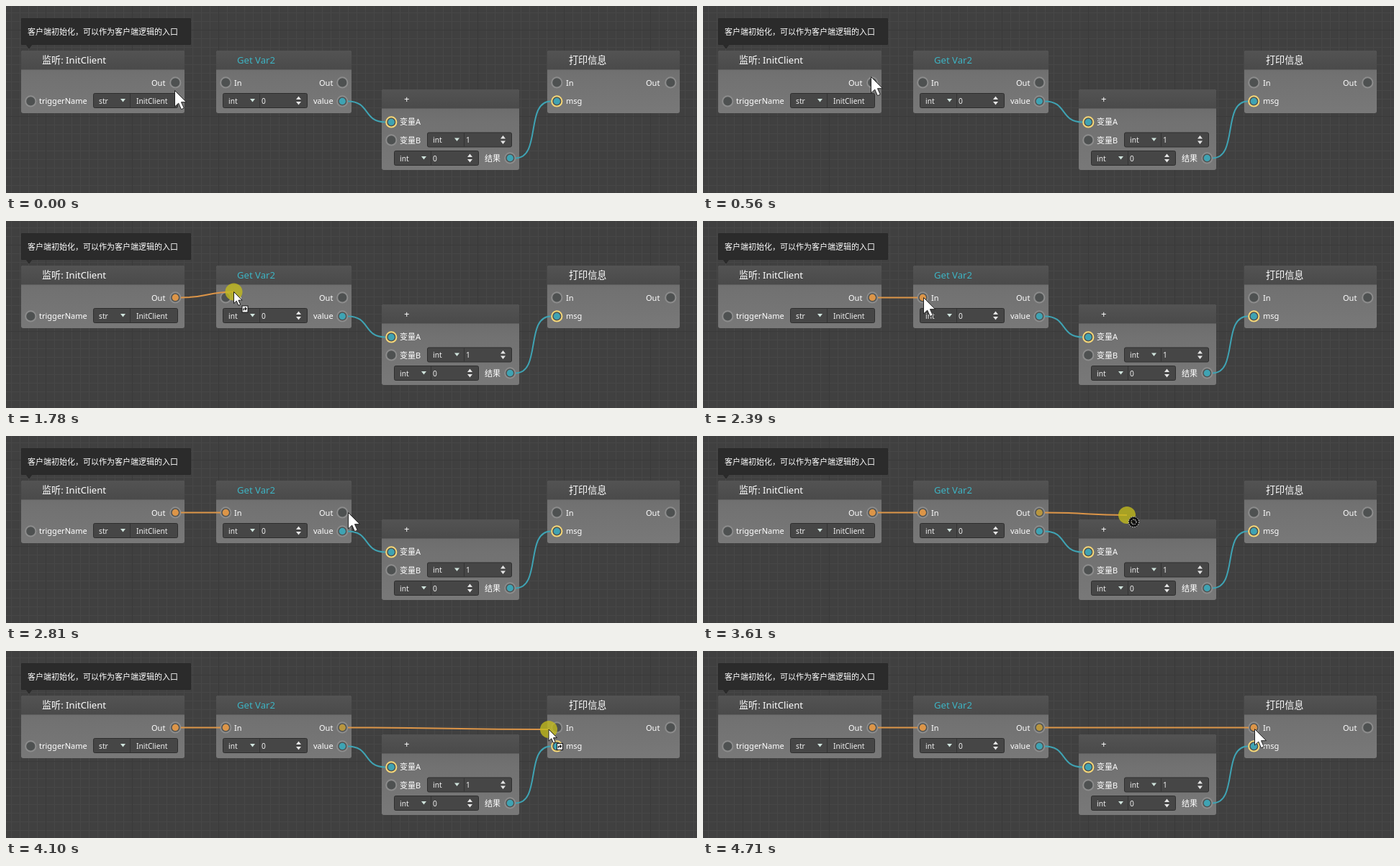
Animation, 960 px wide and 260 px high, one loop 5370 ms. Source, as an HTML page:

```html
<!DOCTYPE html>
<html lang="zh-CN">
<head>
<meta charset="utf-8">
<title>Node graph</title>
<style>
html, body { margin: 0; width: 100%; height: 100%; overflow: hidden; background: #404040; }
svg { display: block; width: 960px; height: 260px; }
text { font-family: "Noto Sans", "Noto Sans CJK SC", sans-serif; fill: #fff; white-space: pre; }
.title { font-size: 13.1px; }
.label { font-size: 11px; }
.field { font-size: 10.2px; fill: #f0f0f0; }
.wire { fill: none; stroke-width: 2; }
</style>
</head>
<body>
<svg id="stage" viewBox="0 0 960 260">
  <defs>
    <pattern id="minor" width="12" height="12" patternUnits="userSpaceOnUse" x="7" y="9">
      <path d="M0 .5H12M.5 0V12" stroke="#474747"/>
    </pattern>
    <pattern id="major" width="120" height="120" patternUnits="userSpaceOnUse" x="55" y="33">
      <path d="M0 .5H120M.5 0V120" stroke="#3a3a3a"/>
    </pattern>
    <linearGradient id="head" x2="0" y2="1">
      <stop stop-color="#535353"/><stop offset="1" stop-color="#4a4a4a"/>
    </linearGradient>
    <linearGradient id="body" x2="0" y2="1">
      <stop stop-color="#686868"/><stop offset=".4" stop-color="#737373"/><stop offset="1" stop-color="#7a7a7a"/>
    </linearGradient>
  </defs>
  <rect width="960" height="260" fill="#404040"/>
  <rect width="960" height="260" fill="url(#minor)"/>
  <rect width="960" height="260" fill="url(#major)"/>
</svg>
<script>
const stage = document.getElementById('stage');
const BLUE = '#3fa3b3', ORANGE = '#dc9548', GOLD = '#f6d878';
const ROW = 106.4;

function add(tag, attrs, parent = stage) {
  const el = document.createElementNS('http://www.w3.org/2000/svg', tag);
  for (const k in attrs) el.setAttribute(k, attrs[k]);
  parent.append(el);
  return el;
}

function text(x, y, str, kind = 'label', fill) {
  const el = add('text', { x, y: y + (kind === 'title' ? 5 : 4), class: kind });
  if (fill) el.style.fill = fill;
  el.textContent = str;
}

function node(x, y, w, h, title, tx, fill) {
  const split = y + 26.5;
  add('rect', { x, y, width: w, height: h, rx: 3, fill: 'url(#body)', opacity: .97 });
  add('path', { d: `M${x} ${split}V${y + 3}q0-3 3-3H${x + w - 3}q3 0 3 3V${split}z`, fill: 'url(#head)' });
  text(tx, y + 13, title, 'title', fill);
}

function port(x, y, fill, ring = '#8c8c8c') {
  const at = { cx: x + .3, cy: y + .4 };
  add('circle', { ...at, r: 7.1, fill: '#4e5151', stroke: ring, 'stroke-width': 2 });
  return add('circle', { ...at, r: 4.6, fill: fill || 'none' });
}

function field(x, y, type, value, spin = true) {
  add('rect', { x: x + .5, y: y + .5, width: 117, height: 20, rx: 2, fill: '#464646', stroke: '#2e2e2e' });
  add('path', { d: `M${x + 51.5} ${y + 1}v19`, stroke: '#333' });
  add('path', { d: `M${x + 38} ${y + 8}h7l-3.5 4.5z`, fill: '#cfe3dc' });
  text(x + 8, y + 10.5, type, 'field');
  text(x + (spin ? 54 : 60), y + 10.5, value, 'field');
  if (spin) add('path', { d: `M${x + 102} ${y + 9}h7l-3.5-4.5zM${x + 102} ${y + 12}h7l-3.5 4.5z`, fill: '#e6e6e6' });
}

const curve = (x0, y0, x1, y1, k) =>
  `M${x0} ${y0}C${x0 + k} ${y0} ${x1 - k} ${y1} ${x1} ${y1}`;
const wire = (color, d = '') => add('path', { d, class: 'wire', stroke: color });

// Tooltip
add('path', { d: 'M21.5 17.5H256.5V53.5H36L32 59L28 53.5H21.5z', fill: '#2b2b2b', stroke: '#282828' });
text(30, 36, '客户端初始化，可以作为客户端逻辑的入口');

// Nodes
node(21, 62, 227, 87, '监听: InitClient', 50);
text(202, 106.5, 'Out');
text(46, 132, 'triggerName');
port(34, 132);
field(121, 121, 'str', 'InitClient', false);

node(292, 62, 188, 87, 'Get Var2', 321, '#3db4c4');
text(317, 106.5, 'In');
text(435, 106.5, 'Out');
text(427, 132, 'value');
field(301, 121, 'int', '0');
port(467, 132, BLUE);

node(522, 116, 191, 112, '+', 553);
text(547, 161, '变量A');
text(547, 187, '变量B');
text(665, 211.5, '结果');
field(585, 175.5, 'int', '1');
field(539, 201, 'int', '0');
port(535, 161, BLUE, GOLD);
port(535, 186);
port(700, 211, BLUE);

node(752, 62, 184, 87, '打印信息', 782);
text(778, 106.5, 'In');
text(889, 106.5, 'Out');
text(778, 132, 'msg');
port(765, 132, BLUE, GOLD);
port(923, 106);

// Ports that light up: [time, dot]
const lit = [
  [1160, port(235, 106, ORANGE)],
  [2390, port(305, 106, ORANGE)],
  [3340, port(467, 106, '#b8963f')],
  [4710, port(765, 106, ORANGE)]
];

wire(BLUE, curve(475, 132.4, 527, 161.4, 31));
wire(BLUE, curve(708, 211.4, 757, 132.4, 36));

// Drags: press and release times with both wire ends
const drags = [
  { from: 1160, to: 2390, x0: 243, x1: 298, hit: 296 },
  { from: 3340, to: 4710, x0: 475, x1: 758, hit: 750 }
].map(d => ({ ...d, line: wire(ORANGE) }));

// Pointers
const halo = add('circle', { r: 12, fill: '#c4bd1c', opacity: .78 });
const arrowPath = 'M0 0V22.5L5.2 17.6L9 26.2L12.8 24.5L9 16.2H16z';
const big = add('g', {}), link = add('g', {}), deny = add('g', {});
add('path', { d: arrowPath, fill: '#fff', stroke: '#222', transform: 'translate(.5 1.5)' }, big);
add('path', { d: arrowPath, fill: '#fff', stroke: '#111', 'stroke-width': 1.3, transform: 'scale(.72)' }, link);
add('rect', { x: 11.5, y: 19.5, width: 8, height: 9, fill: '#fff', stroke: '#111' }, link);
add('path', { d: 'M13.5 26v-2.5h3M15.5 21.5l2 2l-2 2', fill: 'none', stroke: '#111', 'stroke-width': 1.2 }, link);
const sign = { fill: 'none', transform: 'translate(9.5 9.5)' };
const dotted = { ...sign, stroke: '#f4f4f4', 'stroke-width': 1, 'stroke-dasharray': '1.5 1.5' };
add('circle', { ...sign, r: 5.5, stroke: '#111', 'stroke-width': 4 }, deny);
add('path', { ...sign, d: 'M-4-4L4 4', stroke: '#111', 'stroke-width': 4 }, deny);
add('circle', { ...dotted, r: 7.2 }, deny);
add('circle', { ...dotted, r: 3.6 }, deny);

const LOOP = 5370, STEP = 70;
// Pointer path: [time, x, y]
const path = [
  [0, 234, 116], [280, 227, 76], [560, 233, 97], [630, 233, 96],
  [760, 233, 96], [830, 235, 103], [1160, 235, 103], [1290, 243, 99],
  [1360, 256, 98], [1640, 308, 97], [1710, 315, 97], [1850, 318, 100],
  [2190, 306, 105], [2390, 306, 105], [2600, 390, 108], [2810, 475, 105],
  [3000, 475, 105], [3140, 472, 104], [3340, 472, 104], [3470, 492, 107],
  [3540, 536, 109], [3610, 589, 110], [3820, 670, 110], [4100, 754, 109],
  [4380, 766, 107], [LOOP, 766, 107]
];

// Position held in fixed steps that end on each key
function pointerAt(t) {
  const i = path.findIndex(k => k[0] > t);
  const [t0, x0, y0] = path[i - 1], [t1, x1, y1] = path[i];
  const held = Math.max(t0, t1 - Math.ceil((t1 - t) / STEP) * STEP);
  const p = (held - t0) / (t1 - t0);
  return [x0 + (x1 - x0) * p, y0 + (y1 - y0) * p];
}

const show = (el, on) => { el.style.display = on ? '' : 'none'; };

function draw(t) {
  const [x, y] = pointerAt(t);
  const drag = drags.find(d => t >= d.from && t < d.to);
  for (const [at, dot] of lit) show(dot, t >= at);
  for (const d of drags) {
    const done = t >= d.to;
    show(d.line, done || d === drag && x > d.x0 + 4);
    d.line.setAttribute('d', done
      ? curve(d.x0, ROW, d.x1, ROW, 10)
      : curve(d.x0, ROW, x, y, (x - d.x0) / 2));
  }
  const over = drag && x >= drag.hit;
  show(halo, drag);
  show(big, !drag);
  show(link, over);
  show(deny, drag && !over);
  for (const el of [halo, big, link, deny]) el.setAttribute('transform', `translate(${x} ${y})`);
}

const start = performance.now();
function tick(now) {
  draw(Math.max(0, now - start) % LOOP);
  requestAnimationFrame(tick);
}
draw(0);
requestAnimationFrame(tick);
</script>
</body>
</html>
```
